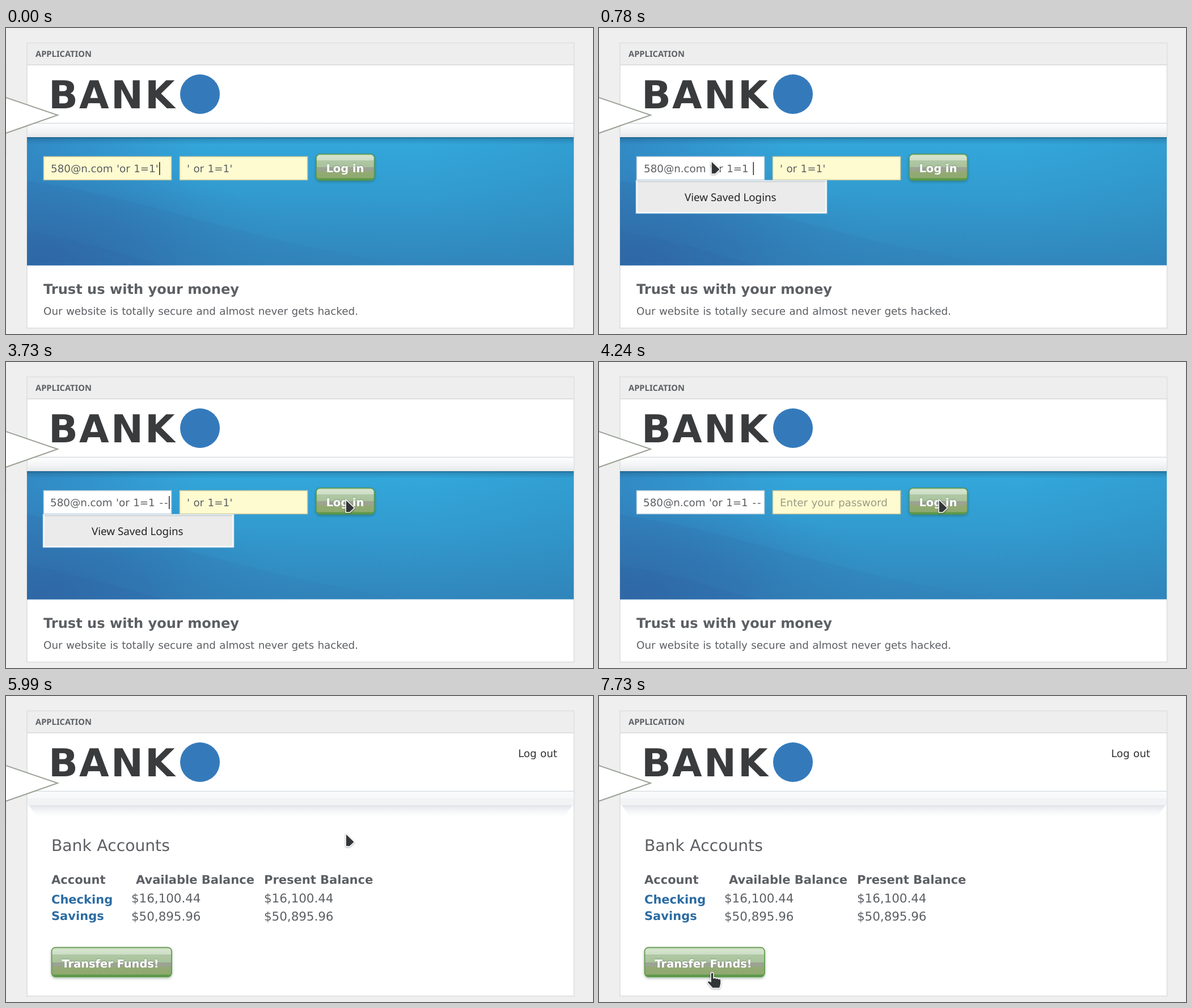
Recreate the animation shown at these times as an HTML page. Size 1035x541 px, loop 8 s.

```html
<!DOCTYPE html>
<html lang="en">
<head>
<meta charset="utf-8">
<title>Bank login</title>
<style>
html, body { margin: 0; width: 100%; height: 100%; overflow: hidden; background: #efefef; }
svg { display: block; width: 100%; height: 100%; }
text { white-space: pre; font-family: "DejaVu Sans", Verdana, sans-serif; font-size: 18.3px; fill: #5c5f63; word-spacing: .6px; text-rendering: geometricPrecision; }
.noto { font-family: "Noto Sans", "Open Sans", sans-serif; word-spacing: 0; }
.bold { font-weight: 700; word-spacing: 0; }
.brand { font-size: 68px; font-weight: 700; fill: #393b3d; }
.table { font-size: 21px; }
.money { font-size: 21.4px; }
.link { fill: #2b6ca3; }
.hint { fill: #9a9b83; }
</style>
</head>
<body>
<svg id="stage" viewBox="0 0 1035 541" preserveAspectRatio="none">
  <defs>
    <linearGradient id="sky" x1=".62" y1="0" x2=".5" y2="1">
      <stop offset="0" stop-color="#33a8dc"/><stop offset=".45" stop-color="#329bcf"/><stop offset="1" stop-color="#3185bb"/>
    </linearGradient>
    <linearGradient id="side" x1="0" x2="1">
      <stop offset="0" stop-color="#3178b8" stop-opacity=".6"/><stop offset="1" stop-color="#3178b8" stop-opacity="0"/>
    </linearGradient>
    <radialGradient id="deep" gradientUnits="userSpaceOnUse" cx="0" cy="0" r="1" gradientTransform="translate(60 410) scale(440 190)">
      <stop offset="0" stop-color="#2f68a4"/><stop offset=".45" stop-color="#3074b0" stop-opacity=".7"/><stop offset="1" stop-color="#3185bd" stop-opacity="0"/>
    </radialGradient>
    <linearGradient id="wave" x1="0" x2="1">
      <stop offset="0" stop-color="#2f6cab" stop-opacity=".25"/><stop offset="1" stop-color="#2f7cb4" stop-opacity=".15"/>
    </linearGradient>
    <linearGradient id="edge" x1="0" x2="1">
      <stop offset="0" stop-color="#2b7cae" stop-opacity="0"/><stop offset="1" stop-color="#2b7cae" stop-opacity=".22"/>
    </linearGradient>
    <linearGradient id="shade" x1="0" y1="0" x2="0" y2="1">
      <stop offset="0" stop-color="#123b55" stop-opacity=".5"/><stop offset=".3" stop-color="#123b55" stop-opacity=".2"/><stop offset="1" stop-color="#123b55" stop-opacity="0"/>
    </linearGradient>
    <linearGradient id="strip" x1="0" y1="0" x2="0" y2="1">
      <stop offset="0" stop-color="#fcfdfd"/><stop offset=".45" stop-color="#f3f5f6"/><stop offset="1" stop-color="#e6e8ea"/>
    </linearGradient>
    <linearGradient id="soft" x1="0" y1="0" x2="0" y2="1">
      <stop offset="0" stop-color="#e1e4e8"/><stop offset=".5" stop-color="#f4f5f7"/><stop offset="1" stop-color="#fff"/>
    </linearGradient>
    <linearGradient id="gloss" x1="0" y1="0" x2="0" y2="1">
      <stop offset="0" stop-color="#b4cda8"/><stop offset=".07" stop-color="#d6e4cf"/><stop offset=".23" stop-color="#cddec5"/>
      <stop offset=".25" stop-color="#b0c8a5"/><stop offset=".5" stop-color="#a9c39c"/>
      <stop offset=".51" stop-color="#9ca494"/><stop offset=".65" stop-color="#9ba390"/>
      <stop offset=".66" stop-color="#94aa76"/><stop offset=".91" stop-color="#8ea96d"/>
      <stop offset=".94" stop-color="#5f9a4b"/><stop offset="1" stop-color="#579543"/>
    </linearGradient>
    <filter id="drop" x="-20%" y="-20%" width="140%" height="150%">
      <feDropShadow dx="0" dy="2" stdDeviation="2" flood-color="#1d3a22" flood-opacity=".35"/>
    </filter>
    <filter id="glow" x="-10%" y="-30%" width="120%" height="160%">
      <feDropShadow dx="0" dy="-1" stdDeviation="1.2" flood-color="#6d7d6a" flood-opacity=".6"/>
    </filter>
  </defs>

  <rect width="1035" height="541" fill="#efefef"/>
  <rect y="66" width="1" height="162" fill="#e3e4e3"/>
  <rect x="37" y="26.500" width="964.500" height="504" fill="#fff" stroke="#dcdcdc" stroke-width="1.500"/>
  <rect x="38" y="27" width="963" height="38" fill="#eee"/>
  <rect x="37" y="64.500" width="965" height="1.500" fill="#dadada"/>
  <text class="noto bold" x="52" y="51" style="font-size:14.700px">APPLICATION</text>
  <text class="brand" x="75 129 185 245" y="142">BANK</text>
  <circle cx="342" cy="117" r="35" fill="#347abb"/>
  <rect x="38" y="167.500" width="963" height="2" fill="#dfe3e6"/>

  <g id="login">
    <rect x="38" y="171" width="963" height="22" fill="url(#strip)"/>
    <rect x="37" y="193" width="964" height="226.500" fill="url(#sky)"/>
    <rect x="37" y="193" width="300" height="226.500" fill="url(#side)"/>
    <rect x="37" y="193" width="964" height="226.500" fill="url(#deep)"/>
    <path d="M37 270C180 290 300 330 430 362S610 400 690 419.500H37z" fill="url(#wave)"/>
    <path d="M37 358C110 372 200 395 275 419.500H37z" fill="#2d62a0" opacity=".18"/>
    <rect x="740" y="193" width="261" height="226.500" fill="url(#edge)"/>
    <rect x="37" y="193" width="964" height="13" fill="url(#shade)"/>
    <rect id="userBox" x="66.500" y="227.500" width="225" height="41" stroke-width="1.500"/>
    <rect x="306.500" y="227.500" width="225" height="41" fill="#fffbd0" stroke="#d5cb9b" stroke-width="1.500"/>
    <text id="user" y="255"></text>
    <text id="dashes" x="270.500" y="255" style="letter-spacing:1.800px"></text>
    <rect id="caret" y="237" width="1.600" height="23" fill="#333"/>
    <text id="pass" x="319" y="255"></text>
    <g id="button1"></g>
    <g id="popup">
      <rect id="popupBox" x="65.500" y="269.500" width="336" fill="#ebebeb" stroke="#cfe2ef" stroke-width="1.500"/>
      <rect id="popupRim" x="67" y="271" width="333" fill="none" stroke="#fbfdfe" stroke-width="1.500"/>
      <rect x="68" y="271" width="331" height="1.200" fill="#bfc3c6"/>
      <text id="saved" class="noto" x="80" y="309" style="font-size:18.800px;fill:#232323">580@n.com 'or 1=1'</text>
      <text id="view" class="noto" x="151" style="font-size:18.800px;fill:#232323">View Saved Logins</text>
    </g>
    <text class="bold" x="66" y="470" style="font-size:24.100px">Trust us with your money</text>
    <text x="66" y="507">Our website is totally secure and almost never gets hacked.</text>
  </g>

  <g id="account">
    <rect x="38" y="171" width="963" height="11" fill="#f8f9fb"/>
    <rect x="38" y="181" width="963" height="12" fill="#f1f3f5"/>
    <path d="M40 193H999L985 213H54z" fill="url(#soft)"/>
    <text x="903" y="108" style="fill:#303234">Log out</text>
    <text x="80" y="274" style="font-size:28.200px">Bank Accounts</text>
    <g id="rows"></g>
    <g id="button2"></g>
  </g>

  <path d="M-9 120L91 154L-9 189z" fill="#fff" stroke="#9ba297" stroke-width="2"/>

  <g id="pointer" fill="#323537" stroke="#fff" stroke-width="1.500" stroke-linejoin="round" style="filter:drop-shadow(0 1px 1.500px rgba(0,0,0,.35))">
    <path id="arrow" d="M0 0L15.500 15L7 23H0z"/>
    <path id="hand" d="M-3 2c0-3 5-3 5 0v8c2-2 4-1 4.500 .5 2-1 4-.5 4.500 1 2-1 4 0 4 2v6l-2 8h-13l-8-9c-2-3 1-5 4-3l1 1z"/>
  </g>
</svg>
<script>
const LOOP = 8000;
const $ = id => document.getElementById(id);
const set = (id, attrs) => { for (const k in attrs) $(id).setAttribute(k, attrs[k]); };
const show = (id, on) => set(id, { visibility: on ? 'inherit' : 'hidden' });

function button(id, x, y, w, h, label, tx, ty) {
  $(id).innerHTML = `
    <rect x="${x}" y="${y}" width="${w}" height="${h}" rx="7" fill="url(#gloss)" stroke="#5a9846" stroke-width="1.600" filter="url(#drop)"/>
    <text class="bold" x="${tx}" y="${ty}" style="font-size:19.400px;fill:#fff" filter="url(#glow)">${label}</text>`;
}
button('button1', 547, 223, 102.5, 46, 'Log in', 564.5, 255);
button('button2', 80.5, 444.5, 211.5, 52, 'Transfer Funds!', 98.5, 480);

const cell = (cls, x, y, s) => `<text class="${cls}" x="${x}" y="${y}">${s}</text>`;
$('rows').innerHTML =
  cell('table bold', 80, 332, 'Account') +
  cell('table bold', 229, 332, 'Available Balance') +
  cell('table bold', 455, 332, 'Present Balance') +
  [['Checking', '$16,100.44', 367, 364.5], ['Savings', '$50,895.96', 396, 397]].map(([name, sum, y, sumY]) =>
    cell('table bold link', 80, y, name) + cell('money', 221, sumY, sum) + cell('money', 455, sumY, sum)).join('');

// Pointer strokes: start time, step count, step length, target, bend of the path
const START = [198, 235];
const MOVES = [
  [2000, 4, 40, [539, 231], [370, 222]],
  [2320, 9, 56, [599, 243], [572, 243]],
  [6680, 9, 44, [914, 142], [780, 170]],
  [7080, 10, 44, [322, 497], [760, 400]],
  [7520, 6, 42, [200, 489], [255, 499]]
];

function pointerAt(t) {
  let from = START;
  for (const [at, n, step, to, bend] of MOVES) {
    if (t < at) break;
    const k = Math.min(1, (Math.floor((t - at) / step) + 1) / n);
    if (k === 1) { from = to; continue; }
    const p = k * k * (3 - 2 * k), q = 1 - p;
    return from.map((a, i) => q * q * a + 2 * p * q * bend[i] + p * p * to[i]);
  }
  return from;
}

// Value of the last [time, value] pair already reached
const stepAt = (t, list) => list.reduce((v, [at, next]) => t >= at ? next : v, list[0][1]);

const CARET = [[0, 270], [230, 266], [660, 271.5], [1310, 279], [1500, 287],
  [2060, 0], [2270, 287], [2770, 0], [3730, 287], [4050, 0]];
const POPUP = [[0, 0], [230, .25], [280, .5], [330, .75], [390, 1], [4050, .4], [4100, 0]];

function render(t) {
  const inside = t >= 5990;
  show('login', !inside);
  show('account', inside);

  const typed = t >= 230;
  set('userBox', { fill: typed ? '#fff' : '#fffbd0', stroke: typed ? '#c3d3dc' : '#d5cb9b' });
  $('user').textContent = "580@n.com 'or 1=1" + (typed ? '' : "'");
  set('user', { x: t < 1500 ? 79 : 78 });
  $('dashes').textContent = stepAt(t, [[0, ''], [1310, '-'], [1500, '--']]);

  const caret = stepAt(t, CARET);
  set('caret', { x: caret, opacity: caret ? 1 : 0 });

  const cleared = t >= 4240;
  $('pass').textContent = cleared ? 'Enter your password' : "' or 1=1'";
  $('pass').setAttribute('class', cleared ? 'hint' : '');

  const extra = t < 720 ? 66 : 0;
  set('popup', { opacity: stepAt(t, POPUP) });
  set('popupBox', { height: 58 + extra });
  set('popupRim', { height: 55 + extra });
  set('view', { y: 306 + extra });
  show('saved', extra > 0);

  const [x, y] = pointerAt(t);
  const hover = inside && x > 80 && x < 292 && y > 444 && y < 498;
  set('pointer', { transform: `translate(${x} ${y})`, opacity: t < 780 ? 0 : 1 });
  show('arrow', !hover);
  show('hand', hover);
}

const began = performance.now();
function tick() {
  render((performance.now() - began) % LOOP);
  requestAnimationFrame(tick);
}
tick();
</script>
</body>
</html>
```
